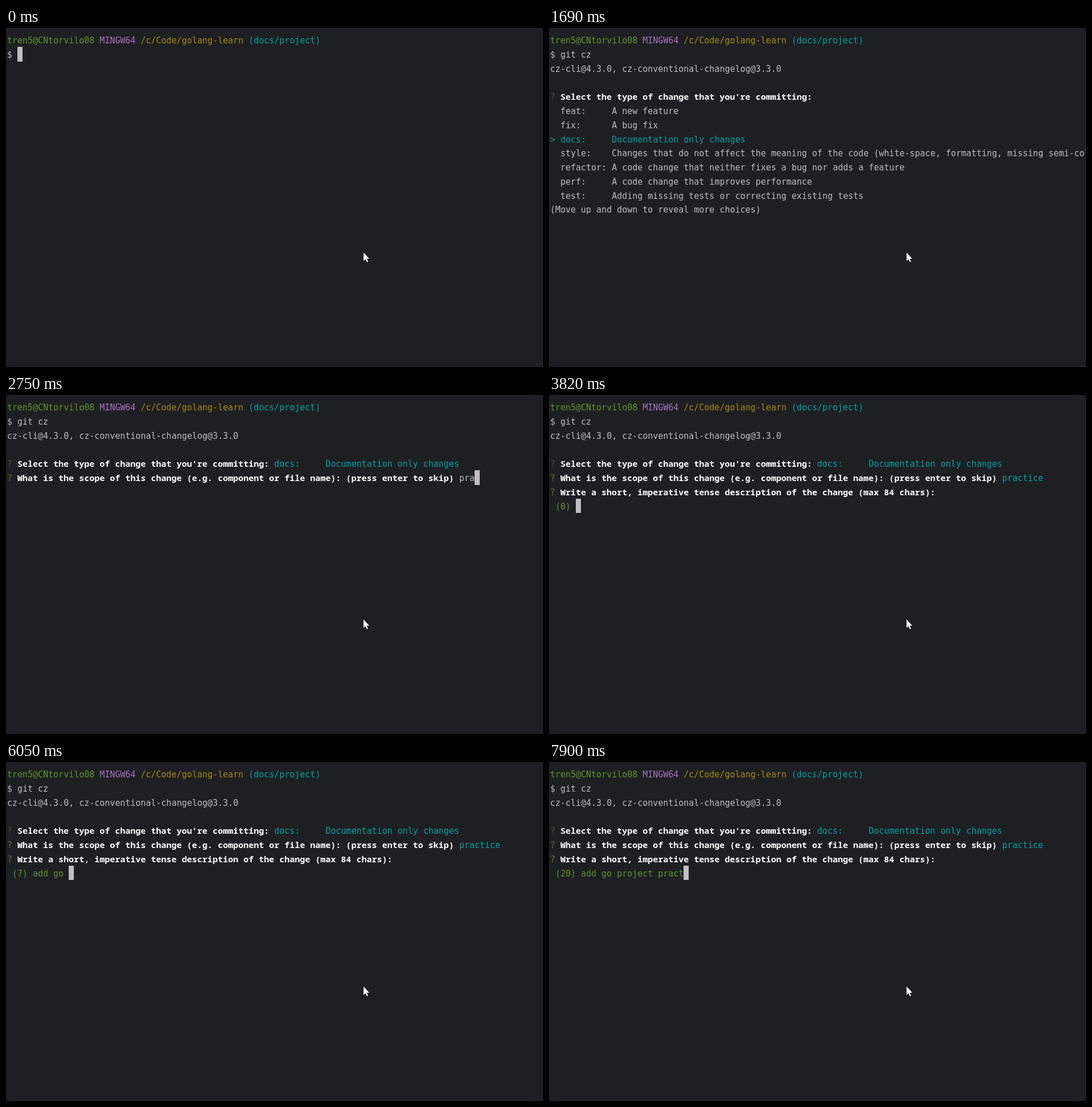
An HTML page with a canvas for the animation above (8000 ms loop, 942 px wide and 595 px high).

```html
<!DOCTYPE html>
<html lang="en">
<head>
<meta charset="utf-8">
<title>Terminal commit prompt</title>
<style>
  html, body { margin: 0; width: 100%; height: 100%; overflow: hidden; background: #1e1f22; }
  canvas { display: block; }
</style>
</head>
<body>
<canvas id="stage" width="942" height="595"></canvas>
<script>
const ctx = document.getElementById('stage').getContext('2d');
const LOOP = 8000, CELL = 9.01, LINE = 24.75;
const BG = '#1e1f22', GREY = '#bcbec4', WHITE = '#ffffff', GREEN = '#5c962c',
      CYAN = '#00a3a3', PURPLE = '#a771bf', YELLOW = '#a68a0d', BLOCK = '#bfbdc3';
const REGULAR = '14.97px "DejaVu Sans Mono", monospace';
const BOLD = 'bold 15.02px "Noto Sans Mono", monospace';

const CHOICES = [
  ['feat:', 'A new feature'],
  ['fix:', 'A bug fix'],
  ['docs:', 'Documentation only changes'],
  ['style:', 'Changes that do not affect the meaning of the code (white-space, formatting, missing semi-colons, etc)'],
  ['refactor:', 'A code change that neither fixes a bug nor adds a feature'],
  ['perf:', 'A code change that improves performance'],
  ['test:', 'Adding missing tests or correcting existing tests']
].map(([key, info]) => key.padEnd(10) + info);

// One entry per step; "|" is the caret, "~" a caret half faded by blinking.
const SCRIPT = {
  shell: '|/g|/gi|/git|/git |/git c|/git cz|/git cz',
  run: '|/',
  banner: '',
  menu: '0/1/2',
  scope: '|//|//|/p|/pr|/pra|/prac|/pract|/practi|/practic|/practice|',
  subject: '|//|//g|/go|/g|o/|go/go/a|go/ago/ad|go/add~go/add|go/add |go/add g|o/add go|/add go/' +
    'add go|/add go |/add go p|/add go p/add go pr|/add go pro|/add go proj|/add go proje|/' +
    'add go projec|/add go project|/add go project/add go project |/add go project p|/' +
    'add go project pr|/add go project prac|/add go project pract|'
};
const PHASES = Object.keys(SCRIPT);

// Steps last 130 ms apart from these.
const GAPS = { 7: 120, 8: 120, 12: 140, 13: 140, 15: 140, 18: 140, 23: 140, 25: 140, 29: 140,
  38: 120, 39: 150, 41: 140, 47: 150, 51: 140, 58: 120, 59: 140 };

const steps = [];
for (const phase of PHASES)
  for (const entry of SCRIPT[phase].split('/')) {
    const i = steps.length;
    steps.push({ phase, entry, time: i ? steps[i - 1].time + (GAPS[i] || 130) : 0 });
  }

const rowTop = row => Math.floor(8.8 + LINE * row);
const rowEnd = row => Math.ceil(8.8 + LINE * (row + 1));
const colX = col => 2 + CELL * col;

function write(row, col, text, color = GREY, font = REGULAR) {
  ctx.font = font;
  ctx.fillStyle = color;
  ctx.fillText(text, colX(col), rowTop(row) + 19);
}

function type(row, col, entry, color) {
  const at = entry.search(/[|~]/);
  const text = entry.replace(/[|~]/, '');
  write(row, col, text, color);
  if (at < 0) return;
  const under = text[at];
  ctx.globalAlpha = entry[at] === '~' ? 0.4 : 1;
  ctx.fillStyle = under ? color : BLOCK;
  ctx.fillRect(Math.round(colX(col + at)), rowTop(row), 9, rowEnd(row) - rowTop(row));
  ctx.globalAlpha = 1;
  if (under) write(row, col + at, under, BG);
}

function ask(row, text, mark) {
  write(row, 0, '?', mark);
  write(row, 2, text, WHITE, BOLD);
}

function drawMenu(selected) {
  if (!selected) write(4, 52, '(Use arrow keys)');
  CHOICES.forEach((choice, i) => {
    const on = i === selected;
    write(5 + i, 0, (on ? '> ' : '  ') + choice, on ? CYAN : GREY);
  });
  write(12, 0, '(Move up and down to reveal more choices)');
}

function drawPointer() {
  ctx.beginPath();
  for (const [x, y] of [[0, 0], [0, 15], [3.4, 11.8], [5.8, 17], [8, 16], [5.7, 11], [10.2, 11]])
    ctx.lineTo(627.2 + x, 394 + y);
  ctx.closePath();
  ctx.strokeStyle = '#0c0c0d';
  ctx.stroke();
  ctx.fillStyle = WHITE;
  ctx.fill();
}

function draw(time) {
  const { phase, entry } = steps.findLast(step => step.time <= time);
  const reached = name => PHASES.indexOf(phase) >= PHASES.indexOf(name);
  ctx.fillStyle = BG;
  ctx.fillRect(0, 0, 942, 595);

  write(0, 0, 'tren5@CNtorvilo08', GREEN);
  write(0, 18, 'MINGW64', PURPLE);
  write(0, 26, '/c/Code/golang-learn', YELLOW);
  write(0, 47, '(docs/project)', CYAN);
  write(1, 0, '$', '#c3b1bd');
  type(1, 2, phase === 'shell' ? entry : 'git cz', GREY);

  if (phase === 'run') type(2, 0, entry, GREY);
  if (reached('banner')) write(2, 0, 'cz-cli@4.3.0, cz-conventional-changelog@3.3.0');
  if (reached('menu')) ask(4, "Select the type of change that you're committing:", '#5e4632');
  if (phase === 'menu') drawMenu(+entry);
  if (reached('scope')) {
    write(4, 52, CHOICES[2], CYAN);
    ask(5, 'What is the scope of this change (e.g. component or file name): (press enter to skip)', '#5f6f3a');
    if (phase === 'scope') type(5, 88, entry, GREY);
    else write(5, 88, 'practice', CYAN);
  }
  if (phase === 'subject') {
    ask(6, 'Write a short, imperative tense description of the change (max 84 chars):', '#5f7a3a');
    const count = `(${entry.replace(/[|~]/, '').length})`;
    write(7, 1, count, GREEN);
    type(7, count.length + 2, entry, GREEN);
  }
  drawPointer();
}

const start = performance.now();
function tick() {
  draw((performance.now() - start) % LOOP);
  requestAnimationFrame(tick);
}
tick();
</script>
</body>
</html>
```
